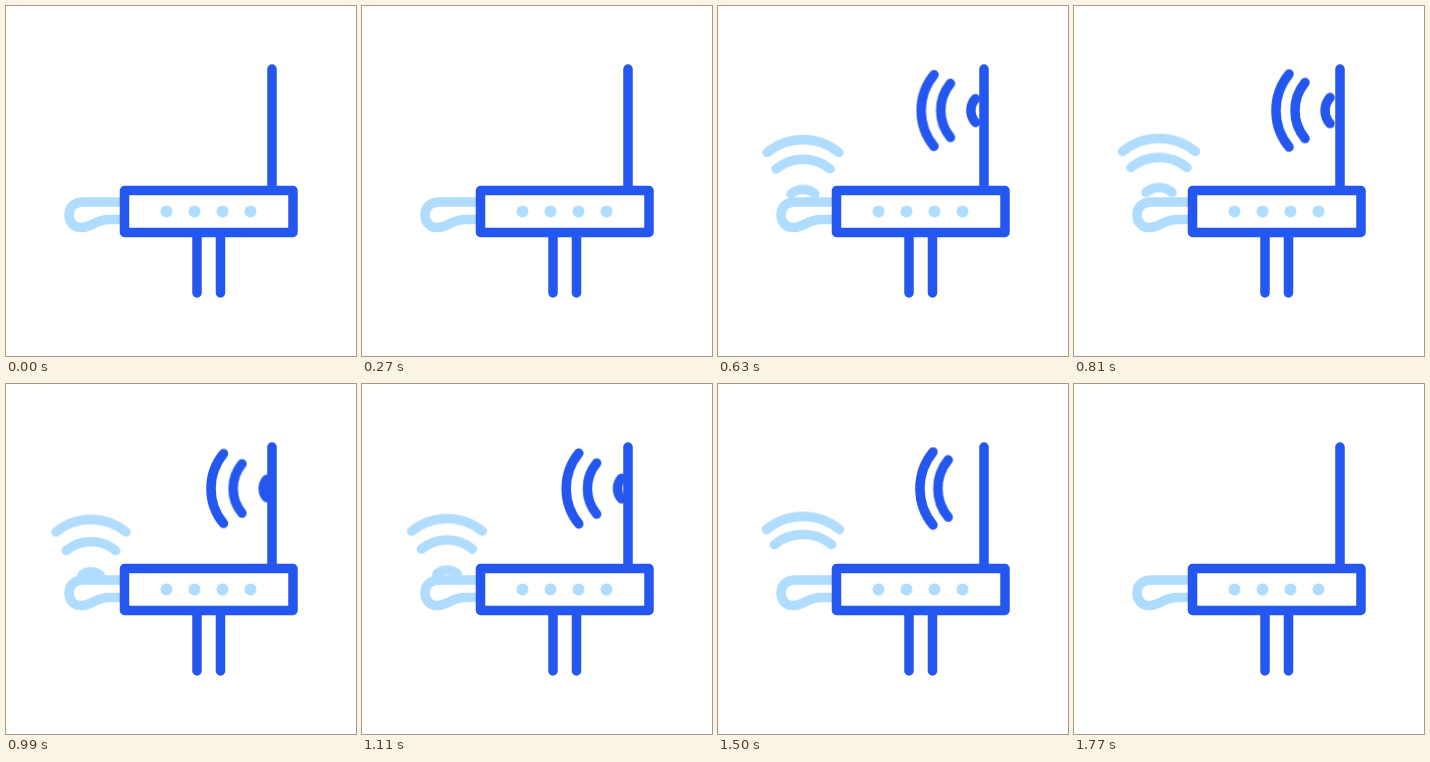
An HTML page without scripts that plays this animation: 350 by 350 pixels, repeating every 1910 ms.

```html
<!DOCTYPE html>
<html lang="en">
<head>
<meta charset="utf-8">
<title>Router signal</title>
<style>
  html, body { margin: 0; width: 100%; height: 100%; overflow: hidden; background: #fff; }
  svg { display: block; width: 350px; height: 350px; }
  .dark { stroke: #2456f0; }
  .light { stroke: #b0dcff; }
  .line { fill: none; stroke-width: 9.5; stroke-linecap: round; stroke-linejoin: round; }
  .wave path {
    vector-effect: non-scaling-stroke;
    transform-origin: 0 0;
    animation: 1910ms linear infinite;
  }
  .wave .far { animation-name: far; }
  .wave .mid { animation-name: mid; }
  .wave .near { animation-name: near; }

  /* grow outward, pulse once, then retract from the inside out */
  @keyframes far {
    0%, 12.57% { transform: scale(0); }
    18.85% { transform: scale(.27); }
    21.99% { transform: scale(.725); }
    25.13% { transform: scale(.9); }
    28.27% { transform: scale(.957); }
    33.5% { transform: scale(.985); }
    42.41% { transform: scale(1); animation-timing-function: ease-in-out; }
    53.4% { transform: scale(.955); animation-timing-function: ease-in-out; }
    65.97%, 82.72% { transform: scale(1); animation-timing-function: ease-in; }
    91.1%, 100% { transform: scale(0); }
  }
  @keyframes mid {
    0%, 15.71% { transform: scale(0); }
    21.99% { transform: scale(.27); }
    25.13% { transform: scale(.725); }
    28.27% { transform: scale(.88); }
    31.41% { transform: scale(.955); }
    36.65% { transform: scale(.985); }
    42.41% { transform: scale(1); animation-timing-function: ease-in-out; }
    53.4% { transform: scale(.874); animation-timing-function: ease-in-out; }
    65.97% { transform: scale(1); }
    72.25%, 79.06% { transform: scale(1.02); animation-timing-function: ease-in; }
    85.86%, 100% { transform: scale(0); }
  }
  @keyframes near {
    0%, 18.85% { transform: scale(0); }
    25.13% { transform: scale(.25); }
    28.27% { transform: scale(.71); }
    31.41% { transform: scale(.88); }
    35.6% { transform: scale(.96); }
    42.41% { transform: scale(1); animation-timing-function: ease-in-out; }
    53.4% { transform: scale(.695); animation-timing-function: ease-in-out; }
    65.97%, 69.11% { transform: scale(1); animation-timing-function: ease-in; }
    76.96%, 100% { transform: scale(0); }
  }
</style>
</head>
<body>
<svg viewBox="0 0 350 350">
  <clipPath id="front"><rect x="-90" y="-60" width="84" height="120"/></clipPath>

  <g class="wave line light" transform="translate(85 202.5) rotate(90)" clip-path="url(#front)">
    <path class="far" d="M-57-36.5A57.5 57.5 0 0 0-57 36.5"/>
    <path class="mid" d="M-41-28A44 44 0 0 0-41 28"/>
    <path class="near" d="M-16-13A19.4 19.4 0 0 0-16 13"/>
  </g>
  <g class="wave line dark" transform="translate(272 104.5)" clip-path="url(#front)">
    <path class="far" d="M-57-36.5A57.5 57.5 0 0 0-57 36.5"/>
    <path class="mid" d="M-41-28A44 44 0 0 0-41 28"/>
    <path class="near" d="M-16-13A19.4 19.4 0 0 0-16 13"/>
  </g>

  <path class="line light" d="M116 196H78C67 196 63 202 63 209C63 217 69 222 76 221.5C87 220.5 90 213.5 103 213.5H116"/>
  <path class="line dark" d="M266 63V184M191 229V287M214.5 229V287"/>
  <rect class="line dark" x="118.5" y="184.5" width="168.5" height="42"/>
  <g fill="#b0dcff">
    <circle cx="160.5" cy="205.5" r="6"/>
    <circle cx="188.5" cy="205.5" r="6"/>
    <circle cx="216.5" cy="205.5" r="6"/>
    <circle cx="244.5" cy="205.5" r="6"/>
  </g>
</svg>
</body>
</html>
```
